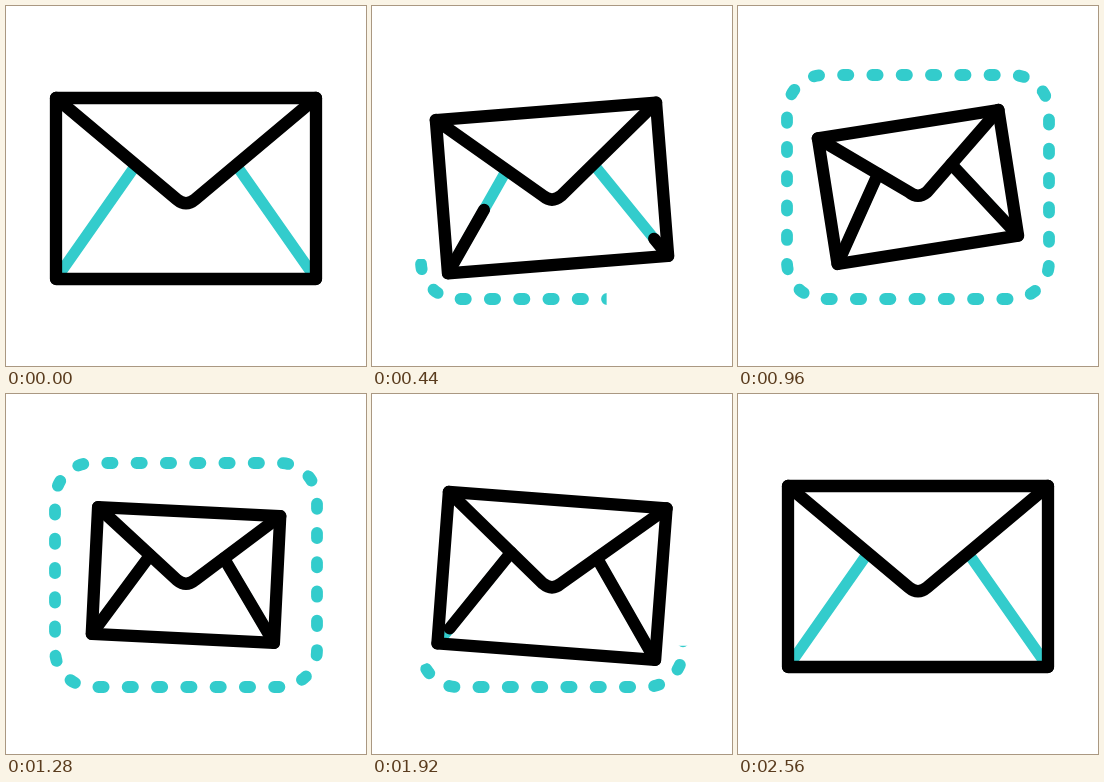
These frames come from a looping animation (360x360 px, 2600 ms). An HTML page without scripts:

```html
<!DOCTYPE html>
<html lang="en">
<head>
<meta charset="utf-8">
<title>Envelope</title>
<style>
  html, body { margin: 0; width: 100%; height: 100%; overflow: hidden; background: #fff; }
  svg { display: block; width: 100vw; height: 100vh; }
  path { fill: none; stroke: #000; stroke-width: 12.3; stroke-linecap: round; stroke-linejoin: round; }

  .pose {
    --ease-in: cubic-bezier(.47, 0, .745, .715);
    --ease-out: cubic-bezier(.39, .575, .565, 1);
    d: var(--rest);
    animation: pose 2.6s var(--ease-in) infinite;
  }
  .body {
    --rest: path("M50 92L310 92L310 273L50 273Z");
    --half-left: path("M63.8 114L284.1 96.7L296.2 250L75.9 267.3Z");
    --left: path("M79.7 132.7L260.2 103.7L280.3 229.3L99.8 258.3Z");
    --level: path("M88 118.2L270.9 116.6L272 243.8L89.1 245.4Z");
    --right: path("M98.3 105.4L279.3 130.6L261.7 256.6L80.7 231.4Z");
    --half-right: path("M75.3 97.4L295.7 113.2L284.7 266.6L64.3 250.8Z");
  }
  .flap {
    --rest: path("M50 92L171 193.5Q180 201 189 193.5L310 92");
    --half-left: path("M63.8 114L171 189.8Q180 197.3 189 189.8L284.1 96.7");
    --left: path("M79.7 132.7L171 186Q180 193.5 189 186L260.2 103.7");
    --level: path("M88 118.2L171 186Q180 193.5 189 186L270.9 116.6");
    --right: path("M98.3 105.4L171 186Q180 193.5 189 186L279.3 130.6");
    --half-right: path("M75.3 97.4L171 189.8Q180 197.3 189 189.8L295.7 113.2");
  }
  .fold-a {
    --rest: path("M50 273L129.9 159");
    --half-left: path("M75.9 267.3L134.6 164");
    --left: path("M99.8 258.3L140 167.9");
    --level: path("M89.1 245.4L142.8 162.9");
    --right: path("M80.7 231.4L146.3 158.6");
    --half-right: path("M64.3 250.8L138.5 158.4");
  }
  .fold-b {
    --rest: path("M310 273L230.1 159");
    --half-left: path("M296.2 250L221.3 158.1");
    --left: path("M280.3 229.3L213.2 158");
    --level: path("M272 243.8L216.8 162.4");
    --right: path("M261.7 256.6L219.7 167.2");
    --half-right: path("M284.7 266.6L225.3 163.7");
  }
  @keyframes pose {
    0%, 4.615% { d: var(--rest); }
    16.92% { d: var(--half-left); animation-timing-function: var(--ease-out); }
    29.23%, 35.38% { d: var(--left); }
    46.54% { d: var(--level); animation-timing-function: var(--ease-out); }
    57.69%, 61.54% { d: var(--right); }
    74.62% { d: var(--half-right); animation-timing-function: var(--ease-out); }
    87.69%, 100% { d: var(--rest); }
  }

  .teal { stroke: #33cccc; stroke-width: 11; }
  .ink {
    stroke-width: 12;
    animation-name: pose, ink;
    animation-timing-function: var(--ease-in), cubic-bezier(.37, 0, .63, 1);
    animation-fill-mode: none, both;
  }
  .ink.fold-b { animation-delay: 0s, .16s; }
  /* dash list: dot, start, length, rest */
  @keyframes ink {
    0%, 4.615% { stroke-dasharray: 0 0 0 2; }
    26.15%, 67.7% { stroke-dasharray: 0 0 1 2; }
    90.77%, 100% { stroke-dasharray: 0 1 0 2; }
  }

  .dashes {
    stroke-width: 11.8;
    stroke-dasharray: .18 .82;
    animation: drift 2.6s linear infinite;
  }
  @keyframes drift {
    0%, 36.92% { stroke-dashoffset: -.17; }
    49.23% { stroke-dashoffset: -.3; }
    100% { stroke-dashoffset: -1.29; }
  }
  .trail {
    stroke: #fff;
    stroke-width: 16;
    stroke-linecap: butt;
    animation: trail 2.6s cubic-bezier(.65, 0, .35, 1) infinite, start 2.6s linear infinite;
  }
  @keyframes trail {
    0%, 4.615% { stroke-dasharray: 0 0 0 40; }
    36.4%, 51.15% { stroke-dasharray: 0 0 31 40; }
    91.3%, 100% { stroke-dasharray: 0 0 0 40; }
  }
  @keyframes start {
    0%, 53.85% { stroke-dashoffset: 0; }
    61.54% { stroke-dashoffset: -.9; }
    73.85%, 100% { stroke-dashoffset: -.6; }
  }
  #frame { fill: inherit; stroke: inherit; stroke-width: inherit; stroke-linecap: inherit; }
</style>
</head>
<body>
<svg viewBox="0 0 360 360">
  <defs>
    <path id="frame" pathLength="31"
      d="M49 253V256A37 37 0 0 0 86 293H274A37 37 0 0 0 311 256V106A37 37 0 0 0 274 69H86A37 37 0 0 0 49 106Z"/>
    <mask id="shown" maskUnits="userSpaceOnUse" width="360" height="360">
      <use href="#frame" class="trail" fill="none"/>
    </mask>
  </defs>
  <g mask="url(#shown)">
    <use href="#frame" class="teal dashes" fill="none" stroke-linecap="round"/>
  </g>
  <path class="pose fold-a teal"/>
  <path class="pose fold-b teal"/>
  <path class="pose fold-a ink" pathLength="1"/>
  <path class="pose fold-b ink" pathLength="1"/>
  <path class="pose body"/>
  <path class="pose flap"/>
</svg>
</body>
</html>
```
